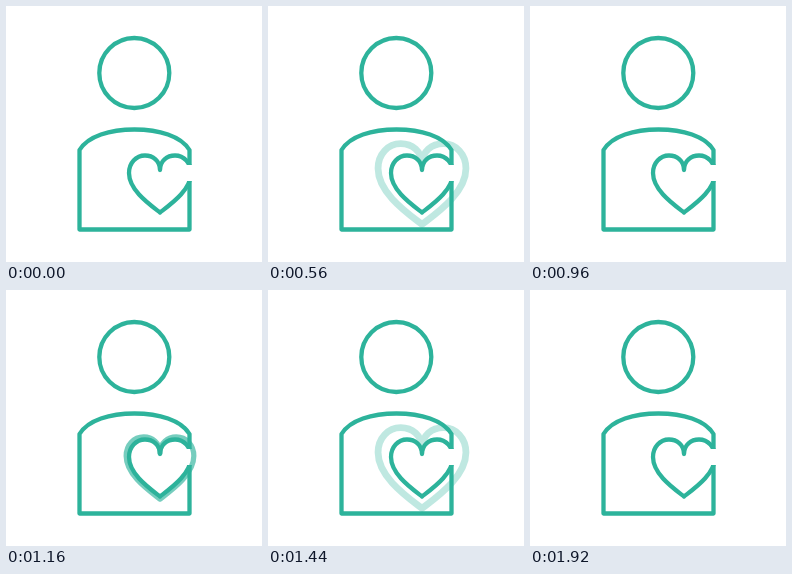
An HTML page that plays this animation: 256 by 256 pixels, repeating every 2.88 s.

```html
<!DOCTYPE html>
<html lang="en">
<head>
<meta charset="utf-8">
<title>Heart pulse</title>
<style>
  html, body { margin: 0; height: 100%; overflow: hidden; background: #fff; }
  svg { display: block; width: 100vw; height: 100vh; }
  .lines { fill: none; stroke: #2db39b; stroke-width: 4.3; stroke-linejoin: round; stroke-linecap: round; }
  #ring { stroke-width: 4.8; }
</style>
</head>
<body>
<svg viewBox="0 0 256 256">
  <defs>
    <path id="heart" d="M154 164C154 155 147 149.5 139 149.5C130 149.5 123 157 123 167
      C123 184 143 198 154 206.5C165 198 185 184 185 167C185 157 178 149.5 169 149.5
      C161 149.5 154 155 154 164"/>
  </defs>
  <g class="lines">
    <circle cx="128.3" cy="67" r="35"/>
    <path d="M73.5 144C82 130 104 123.5 128.5 123.5S175 130 183.5 144V223.5H73.5Z"/>
    <use href="#heart"/>
  </g>
  <!-- opening in the outline at the right of the heart -->
  <rect x="178" y="159" width="12" height="16" fill="#fff"/>
  <use id="ring" class="lines" href="#heart"/>
</svg>
<script>
const LOOP = 2880, STEP = 40, START = 240, BEAT = 840, BEATS = 2, SWELL = 680;
const CENTER = { x: 154, y: 178 };
const ring = document.getElementById('ring');

// 0 at rest, 1 at the widest point of a beat
function swell(time) {
  const t = time - START;
  if (t < 0 || t >= BEAT * BEATS) return 0;
  const phase = t % BEAT;
  return phase < SWELL ? Math.sin(Math.PI * phase / SWELL) ** 1.5 : 0;
}

function draw(now) {
  const time = Math.floor(now % LOOP / STEP) * STEP;
  const amount = swell(time);
  const scale = 1 + 0.42 * amount;
  const { x, y } = CENTER;
  ring.setAttribute('transform', `translate(${x} ${y}) scale(${scale}) translate(${-x} ${-y})`);
  ring.setAttribute('opacity', Math.min(4 * amount, 0.75 - 0.45 * amount));
}

const origin = performance.now();
function tick() {
  draw(performance.now() - origin);
  requestAnimationFrame(tick);
}
tick();
</script>
</body>
</html>
```
